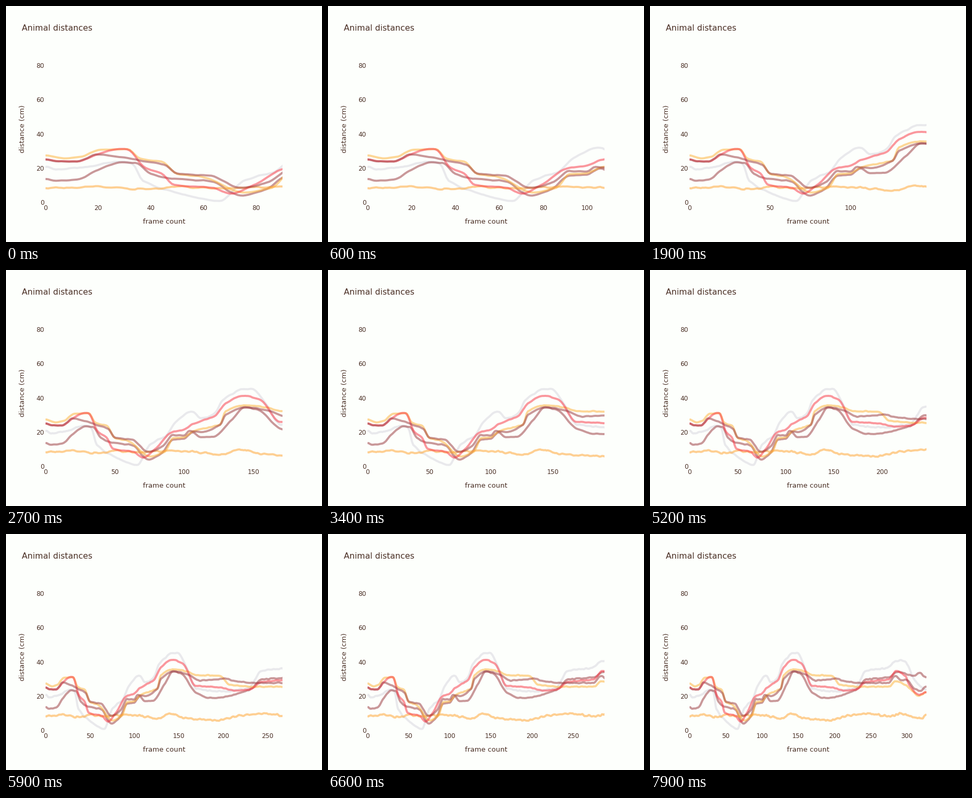
Write a matplotlib script that moves like this. It is 600 px wide and 450 px high and loops after 8 s.

```python
import matplotlib.pyplot as plt
import numpy as np
from matplotlib.animation import FuncAnimation

W, H, DPI = 600, 450, 100
LEFT, RIGHT, TOP, BOTTOM = 75, 525, 100, 375
PX_PER_CM = 3.26
FRAMES, START, STEP = 80, 90, 3
LAST = START + STEP * (FRAMES - 1)
PAPER, INK = "#fdfffc", "#4b3026"

plt.rcParams["font.family"] = "DejaVu Sans"
rng = np.random.default_rng(4)
counts = np.arange(LAST + 1)


def smooth(keys):
    """Monotone cubic through (count, cm) key points."""
    x, y = np.array(keys, float).T
    h, d = np.diff(x), np.diff(y) / np.diff(x)
    m = np.zeros_like(x)
    same = d[:-1] * d[1:] > 0
    m[1:-1][same] = 2 / (1 / d[:-1][same] + 1 / d[1:][same])
    i = np.clip(np.searchsorted(x, counts, "right") - 1, 0, len(h) - 1)
    t = (counts - x[i]) / h[i]
    s = t * t * (3 - 2 * t)
    bend = h[i] * t * (1 - t) * (m[i] * (1 - t) - m[i + 1] * t)
    return y[i] + (y[i + 1] - y[i]) * s + bend


def wobble(size):
    """Seeded tracking jitter, softened over neighbouring samples."""
    noise = rng.normal(0, size, counts.size + 2)
    return np.convolve(noise, [0.3, 0.4, 0.3], "valid")


def px(size):
    """Pixels to points."""
    return size * 72 / DPI


def label(x, y, text, size, ha="center", va="baseline", **kw):
    return fig.text(x / W, 1 - y / H, text, fontsize=px(size), color=INK,
                    ha=ha, va=va, **kw)


# Turning points of each distance, with colour and jitter.
curves = [
    ("#d6d5de", 0.3, [
        (0, 20.9), (4, 19.6), (14, 20.6), (29, 24.2), (33, 22.5), (37, 13),
        (50, 5.8), (66, 1), (76, 13.5), (86, 17.6), (94, 26), (106, 32.2),
        (112, 28.3), (122, 30.8), (128, 38.8), (144, 45.4), (149, 45.4),
        (158, 38), (170, 24.5), (200, 23), (229, 25), (243, 34.7),
        (273, 36.8), (286, 40.8), (296, 40.8), (311, 29.5), (327, 24)]),
    ("#973338", 0.2, [
        (0, 13.8), (4, 12.9), (12, 13.4), (20, 19.2), (29, 23.6),
        (34, 23.3), (40, 17.1), (46, 14.6), (63, 12.5), (74, 4.2), (84, 8),
        (92, 15.9), (100, 16.3), (106, 20.1), (112, 17.4), (121, 17.7),
        (134, 27), (144, 34.7), (154, 33), (169, 22.5), (186, 19),
        (231, 24.2), (243, 29.8), (276, 31.3), (286, 34.4), (310, 32.2),
        (317, 33.9), (327, 31)]),
    ("#fdb134", 0.2, [
        (0, 27.6), (6, 26.1), (13, 26.8), (20, 30.6), (31, 31.3),
        (36, 25.8), (44, 24), (50, 16.8), (60, 15), (75, 6), (86, 8.8),
        (92, 16.6), (100, 17.2), (106, 20.6), (126, 24.8), (130, 32.5),
        (144, 35.9), (158, 34.8), (170, 32.5), (197, 32), (207, 27),
        (241, 25.7), (276, 25.8), (284, 29), (301, 25.8), (317, 20.4),
        (327, 22.4)]),
    ("#ffa12a", 0.4, [
        (0, 8.7), (20, 9.2), (37, 8.1), (50, 9.3), (66, 8.3), (90, 9.2),
        (108, 8.9), (126, 6.8), (141, 10), (148, 8.5), (178, 6.4),
        (192, 6), (210, 8), (243, 9.9), (278, 8.4), (291, 9.8), (320, 7.2),
        (327, 9.2)]),
    ("#f9303f", 0.2, [
        (0, 25.3), (5, 24.2), (12, 24.2), (20, 28.4), (28, 31.5),
        (31, 31.2), (38, 20.2), (44, 17.2), (49, 10.4), (64, 8.6),
        (70, 5.2), (80, 11), (91, 20), (100, 21.7), (106, 24.7),
        (122, 29.7), (130, 36.9), (143, 41.5), (155, 39), (169, 26.2),
        (192, 25.5), (216, 23.5), (231, 24.2), (243, 28.4), (275, 30),
        (285, 34.8), (298, 31.9), (303, 26.8), (317, 21), (327, 22.4)]),
    ("#973338", 0.2, [
        (0, 25.3), (5, 24.1), (12, 24.2), (20, 28.2), (30, 26.3), (38, 24),
        (45, 22.3), (50, 17), (63, 15.6), (74, 8.7), (85, 12.3),
        (92, 18.6), (100, 18.2), (104, 20.8), (112, 20.2), (126, 24.6),
        (130, 30.2), (144, 34.6), (160, 33), (174, 29.3), (203, 30.5),
        (210, 29.3), (239, 27.9), (274, 28), (284, 32), (292, 29.4),
        (299, 29.8), (310, 24.8), (319, 23.3), (327, 26)]),
]

fig = plt.figure(figsize=(W / DPI, H / DPI), dpi=DPI, facecolor=PAPER)
ax = fig.add_axes([LEFT / W, 1 - BOTTOM / H,
                   (RIGHT - LEFT) / W, (BOTTOM - TOP) / H])
ax.set_axis_off()
ax.set_ylim(0, (BOTTOM - TOP) / PX_PER_CM)
for color, jitter, keys in curves:
    ax.plot(counts, smooth(keys) + wobble(jitter), color=color, alpha=0.5,
            lw=px(4), solid_capstyle="butt", solid_joinstyle="round")

label(30, 47, "Animal distances", 15.8, ha="left")
label(300, 415, "frame count", 13.1)
label(38, 234, "distance (cm)", 13.3, ha="right", va="center", rotation=90)
for v in range(0, 81, 20):
    label(72.5, BOTTOM - v * PX_PER_CM + 4, str(v), 12, ha="right")
ticks = [label(0, 389, "", 12) for _ in range(8)]


def update(i):
    end = START + STEP * i
    ax.set_xlim(0, end)
    gap = 20 if end <= 132 else 50
    for k, tick in enumerate(ticks):
        v = k * gap
        tick.set_text(str(v) if v <= end else "")
        tick.set_x((LEFT + (RIGHT - LEFT) * v / end) / W)
    return ticks


anim = FuncAnimation(fig, update, frames=FRAMES, interval=100,
                     repeat=True, repeat_delay=0, blit=False)
plt.show()
```
